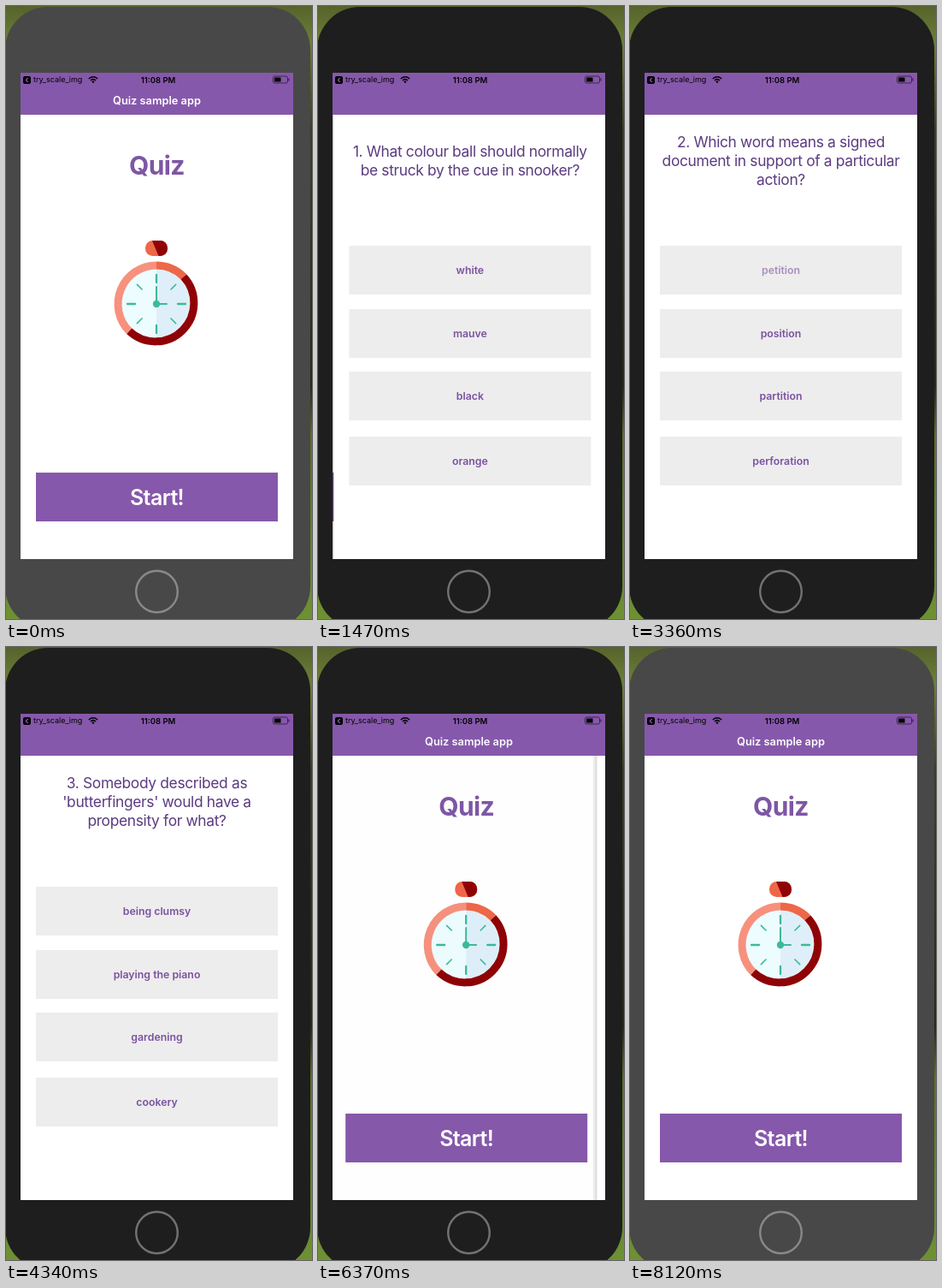
An HTML page for the animation above (8190 ms loop, 358 by 716 pixels).

```html
<!DOCTYPE html>
<html lang="en">
<head>
<meta charset="utf-8">
<title>Quiz sample app</title>
<style>
html, body { margin: 0; width: 100%; height: 100%; overflow: hidden; background: #3c4722; }
svg { display: block; width: 358px; height: 716px; }
text { font-family: Inter, "Open Sans", sans-serif; text-anchor: middle; }
.status { font-size: 9px; text-anchor: start; }
.clock { font-size: 9.5px; font-weight: 600; }
.title { font-size: 12.8px; font-weight: 600; fill: #fff; }
.head { font-size: 30px; font-weight: 700; letter-spacing: -.02em; fill: #7d57a5; }
.action { font-size: 25px; font-weight: 600; letter-spacing: -.025em; fill: #fff; }
.ask { font-size: 17.4px; letter-spacing: -.02em; fill: #5b3b80; }
.answer { font-size: 12.3px; font-weight: 600; fill: #7b52a0; }
</style>
</head>
<body>
<svg viewBox="0 0 358 716">
  <defs>
    <linearGradient id="grass" x2="0" y2="1">
      <stop offset="0" stop-color="#56622c"/>
      <stop offset=".06" stop-color="#6c8135"/>
      <stop offset=".2" stop-color="#3b3d25"/>
      <stop offset=".62" stop-color="#26281b"/>
      <stop offset=".7" stop-color="#5c6f2e"/>
      <stop offset="1" stop-color="#6d9133"/>
    </linearGradient>
    <linearGradient id="shade">
      <stop offset="0" stop-opacity="0"/>
      <stop offset="1" stop-opacity=".16"/>
    </linearGradient>
    <clipPath id="view"><rect x="17" y="127" width="319" height="519"/></clipPath>
    <clipPath id="knob"><rect x="163" y="274" width="26" height="18" rx="8.5"/></clipPath>
  </defs>

  <rect width="358" height="716" fill="url(#grass)"/>
  <rect id="body" x="-1" y="1" width="357" height="727" rx="50"/>
  <circle id="home-key" cx="176.5" cy="684" r="24.3" fill="none" stroke-width="2.4"/>

  <rect x="17" y="78" width="319" height="50" fill="#8658ab"/>
  <g>
    <rect x="20" y="82" width="9" height="9" rx="2"/>
    <path d="M25.8 84 23.3 86.5 25.8 89" fill="none" stroke="#8658ab" stroke-width="1.2"/>
    <text class="status" x="32" y="89.3">try_scale_img</text>
    <g fill="none" stroke="#000" stroke-width="1.5">
      <path d="M96.8 85Q102 80.6 107.200 85M98.900 87Q102 84.300 105.100 87"/>
    </g>
    <path d="M100.300 88.300Q102 86.800 103.700 88.300L102 90.300Z"/>
    <text class="clock" x="178" y="89.500">11:08 PM</text>
    <rect x="312.500" y="82" width="17" height="8" rx="2" fill="none" stroke="#251a30" stroke-width=".8"/>
    <rect x="314" y="83.400" width="7.500" height="5.200" rx=".6"/>
    <path d="M331 84.500v3" stroke="#251a30"/>
  </g>
  <text class="title" id="title" x="176.500" y="115">Quiz sample app</text>
  <g id="pages" clip-path="url(#view)"></g>
</svg>
<script>
const LOOP = 8190, STEP = 70, WIDTH = 319, PARALLAX = 96;
const $ = id => document.getElementById(id);

const rect = (x, y, w, h, fill, extra = '') =>
  `<rect x="${x}" y="${y}" width="${w}" height="${h}" fill="${fill}" ${extra}/>`;
const label = (kind, y, size, text) =>
  `<text class="${kind}" x="176.5" y="${y + size * .36}">${text}</text>`;
const action = (y, text) =>
  rect(35, y, 283, 57, '#8658ab') + `<g class="tap">${label('action', y + 28.500, 25, text)}</g>`;

function stopwatch() {
  let ticks = '';
  for (let i = 0; i < 8; i++) {
    const thick = i % 2 ? 1.6 : 2.3, [near, far] = i % 2 ? [24, 32] : [25, 34];
    ticks += `<path d="M0 ${-far}V${-near}" stroke-width="${thick}" transform="rotate(${i * 45})"/>`;
  }
  return `<g clip-path="url(#knob)">${rect(163, 274, 26, 18, '#ee6748')}
      <path d="M171 274H190V292H178.500Z" fill="#8f0206"/></g>
    <g transform="translate(176 348)">
      <circle r="45" fill="#edfcfe"/><path d="M0-45A45 45 0 0 1 0 45Z" fill="#dfeff9"/>
      <g fill="none" stroke-width="9">
        <path d="M0-45A45 45 0 0 0-31.800 31.800" stroke="#f7917e"/>
        <path d="M0-45A45 45 0 0 1 31.800-31.800" stroke="#ee6748"/>
        <path d="M31.800-31.800A45 45 0 0 1-31.800 31.800" stroke="#8f0206"/>
      </g>
      <g stroke="#3cba98" stroke-linecap="round">${ticks}<path d="M0-20V0H12" fill="none" stroke-width="2"/></g>
      <circle r="4.200" fill="#3cba98"/>
    </g>`;
}

function trophy() {
  const star = Array.from({ length: 10 }, (_, i) => {
    const r = i % 2 ? 7.200 : 17.500, a = i * Math.PI / 5;
    return [176 + r * Math.sin(a), 279 - r * Math.cos(a)].map(v => v.toFixed(1));
  });
  return `<path d="M146 261.500H130C130 286 142 306 162 311M206 261.500H222C222 286 210 306 190 311"
      fill="none" stroke="#f1ba58" stroke-width="6"/>
    <path d="M171 316H181L186 328H166Z" fill="#e8674f"/>
    <path d="M143 247H209V280C209 302 193 314 176 319C159 314 143 302 143 280Z" fill="#fdd462"/>
    ${rect(141.500, 245, 69, 4, '#f1ba58', 'rx="1.500"')}
    <polygon points="${star.join(' ')}" fill="#fff"/>
    ${rect(151, 326, 50, 18, '#fdd462', 'rx="3"')}`;
}

function question(lines, answers) {
  const tops = [280, 354, 427, 503];
  return lines.map((s, i) => label('ask', 181 + 22 * (i - (lines.length - 1) / 2), 17.4, s)).join('') +
    answers.map((s, i) => rect(35, tops[i], 283, 57, '#ededed') +
      `<g class="${i ? '' : 'tap'}">${label('answer', tops[i] + 28.500, 12.3, s)}</g>`).join('');
}

const pages = [
  label('head', 186, 30, 'Quiz') + stopwatch() + action(545, 'Start!'),
  question(['1. What colour ball should normally', 'be struck by the cue in snooker?'],
    ['white', 'mauve', 'black', 'orange']),
  question(['2. Which word means a signed', 'document in support of a particular', 'action?'],
    ['petition', 'position', 'partition', 'perforation']),
  question(['3. Somebody described as', "'butterfingers' would have a", 'propensity for what?'],
    ['being clumsy', 'playing the piano', 'gardening', 'cookery']),
  label('head', 195, 30, 'Congrads!') + trophy() + action(551, 'Back to Home')
].map(content => {
  const g = document.createElementNS('http://www.w3.org/2000/svg', 'g');
  g.innerHTML = rect(11, 127, 6, 519, 'url(#shade)') + rect(17, 127, WIDTH, 519, '#fff') +
    content + rect(17, 127, WIDTH, 519, '#000', 'class="dim"');
  $('pages').append(g);
  return { g, tap: g.querySelector('.tap'), dim: g.querySelector('.dim') };
});

// Navigation: start time, lower page, upper page; the last one slides back.
const moves = [
  { at: 920, low: 0, up: 1 },
  { at: 2231, low: 1, up: 2 },
  { at: 3400, low: 2, up: 3 },
  { at: 4430, low: 3, up: 4 },
  { at: 5940, low: 0, up: 4, back: true }
];

const clamp = v => Math.min(1, Math.max(0, v));
const smooth = v => v < .5 ? 2 * v * v : 1 - 2 * (1 - v) ** 2;
const spring = s => 1 - (1 + 12 * s) * Math.exp(-12 * s);
const slide = ms => clamp(spring(Math.max(0, ms) / 1000) / spring(.6));
const tapOpacity = ms => ms < 0 ? 1 - .8 * clamp((ms + 80) / 80) : .2 + .8 * smooth(clamp((ms - 45) / 250));

function place(page, x, dim) {
  page.g.style.display = '';
  page.g.setAttribute('transform', `translate(${x.toFixed(2)} 0)`);
  page.dim.setAttribute('opacity', dim);
}

function render(t) {
  const move = moves.filter(m => t >= m.at).pop() || moves[0];
  const p = slide(t - move.at), cover = move.back ? 1 - p : p;
  for (const page of pages) page.g.style.display = 'none';
  place(pages[move.low], -PARALLAX * cover, .09 * cover);
  if (cover > 0) place(pages[move.up], WIDTH * (1 - cover), 0);
  for (const m of moves) pages[m.back ? m.up : m.low].tap.setAttribute('opacity', tapOpacity(t - m.at));
  $('title').setAttribute('opacity', move.low === 0 ? 1 - cover : 0);

  const active = t >= 490 && t < 7420;
  $('body').setAttribute('fill', active ? '#1e1e1e' : '#484848');
  $('home-key').setAttribute('stroke', active ? '#727272' : '#898989');
}

function tick() {
  const t = performance.now() % LOOP;
  render(Math.floor(t / STEP) * STEP);
  requestAnimationFrame(tick);
}
tick();
</script>
</body>
</html>
```
